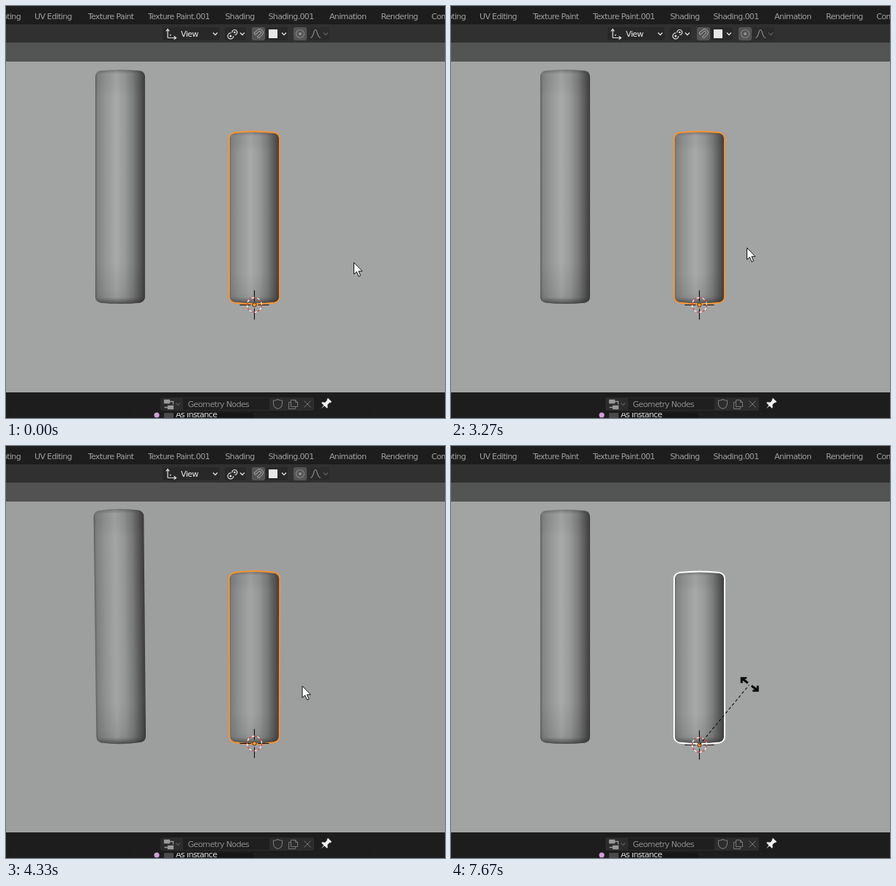
Animation of 600x563 px, one loop 8000 ms. Source, as an HTML page with a canvas:

```html
<!DOCTYPE html>
<html lang="en">
<head>
<meta charset="utf-8">
<title>Viewport orbit</title>
<style>
  html, body { margin: 0; height: 100%; overflow: hidden; background: #1d1d1d; }
  canvas { display: block; width: 100%; height: 100%; }
</style>
</head>
<body>
<canvas id="stage" width="600" height="563"></canvas>
<script>
const ctx = document.getElementById('stage').getContext('2d');
const LOOP = 8000, SCALE_START = 7470;

// Tubes: top x, y, bottom x, y, top and bottom half width, shoulder.
// Cross: x, y, angle, vertical squash. Light: backdrop grey, dimming of the tubes.
const FRONT = {
  left: [156, 87, 156, 407, 34, 34, 9],
  right: [339.5, 171.5, 339.5, 407, 34.5, 34.5, 9],
  cross: [339.5, 408.5, 0, 1],
  light: [162, 0]
};
const PITCHED = {
  left: [145.5, 82, 163, 408, 35.5, 33, 13],
  right: [339.5, 168.5, 339.5, 407.5, 35.5, 33, 14],
  cross: [339.5, 398.5, 0, .92],
  light: [139, .14]
};
const ROLLED = {
  left: [180, 59, 146, 385, 34, 33, 11],
  right: [355.5, 171, 325, 410, 34, 33.5, 12],
  cross: [323.5, 405.5, .125, .97],
  light: [151, .04]
};

const mix = (a, b, k) => a.map((v, i) => v + (b[i] - v) * k);
const mixView = (a, b, k) =>
  Object.fromEntries(Object.keys(a).map(key => [key, mix(a[key], b[key], k)]));
const ALMOST = mixView(FRONT, PITCHED, .15);

const VIEW_KEYS = [
  [0, FRONT], [3330, FRONT], [3670, PITCHED], [4070, ROLLED],
  [4330, mixView(FRONT, PITCHED, .2)], [4600, ALMOST], [5130, ALMOST], [5270, FRONT]
];
const POINTER_KEYS = [
  [0, [475.5, 350.5]], [340, [475.5, 350.5]], [1130, [359, 329]], [2130, [358.5, 329.5]],
  [2330, [358, 335]], [2600, [358, 335]], [3130, [404, 331]], [3270, [404.5, 330.5]],
  [3340, [404.5, 330.5]], [3670, [404.5, 378.5]], [4070, [384.5, 338.5]],
  [4330, [405, 328]], [4600, [407.5, 326.5]]
];

function sample(keys, time, blend) {
  const next = keys.findIndex(key => key[0] > time);
  if (next < 0) return keys[keys.length - 1][1];
  const [t0, a] = keys[next - 1], [t1, b] = keys[next];
  const k = (time - t0) / (t1 - t0);
  return blend(a, b, k * k * (3 - 2 * k));
}

function box(x, y, w, h, color, radius = 0) {
  ctx.fillStyle = color;
  ctx.beginPath();
  ctx.roundRect(x, y, w, h, radius);
  ctx.fill();
}

function line(path, color, width = 1.2) {
  ctx.strokeStyle = color;
  ctx.lineWidth = width;
  ctx.stroke(new Path2D(path));
}

function shape(path, color) {
  ctx.fillStyle = color;
  ctx.fill(new Path2D(path));
}

function disc(x, y, r, color) {
  ctx.fillStyle = color;
  ctx.beginPath();
  ctx.arc(x, y, r, 0, Math.PI * 2);
  ctx.fill();
}

function label(text, x, y, color, align = 'left') {
  ctx.font = '11px "DejaVu Sans", sans-serif';
  ctx.letterSpacing = '-0.65px';
  ctx.textAlign = align;
  ctx.fillStyle = color;
  ctx.fillText(text, x, y);
}

const chevron = (x, y, color) => line(`M${x - 3} ${y - 1.5}l3 3 3-3`, color, 1.3);

function gradient(x0, y0, x1, y1, stops) {
  const g = ctx.createLinearGradient(x0, y0, x1, y1);
  stops.forEach(([at, color]) => g.addColorStop(at, color));
  return g;
}

function drawTube([tx, ty, bx, by, wt, wb, s], dim, outline) {
  const length = Math.hypot(bx - tx, by - ty);
  const c = 1 + (s - 8) * .6;
  ctx.save();
  ctx.translate(tx, ty);
  ctx.rotate(Math.atan2(tx - bx, by - ty));

  const body = new Path2D();
  body.moveTo(-wt, s);
  body.quadraticCurveTo(-wt * .98, c + 1.5, -wt * .8, c);
  body.quadraticCurveTo(0, -c, wt * .8, c);
  body.quadraticCurveTo(wt * .98, c + 1.5, wt, s);
  body.lineTo(wb, length - s);
  body.quadraticCurveTo(wb * .98, length - c - 1.5, wb * .8, length - c);
  body.quadraticCurveTo(0, length + c, -wb * .8, length - c);
  body.quadraticCurveTo(-wb * .98, length - c - 1.5, -wb, length - s);
  body.closePath();

  const fills = [
    gradient(-wt, 0, wt, 0, [
      [0, '#626363'], [.05, '#828484'], [.2, '#949696'], [.42, '#a8aaa9'], [.6, '#989a99'],
      [.76, '#7c7d7d'], [.9, '#585858'], [1, '#3e3c3d']
    ]),
    gradient(0, 0, 0, length, [
      [0, 'rgba(40,40,40,.38)'], [6 / length, 'rgba(40,40,40,.06)'], [.06, 'rgba(40,40,40,.06)'],
      [.12, 'rgba(40,40,40,0)'], [.82, 'rgba(40,40,40,0)'], [.94, 'rgba(40,40,40,.09)'],
      [1 - 9 / length, 'rgba(40,40,40,.14)'], [1, 'rgba(30,30,30,.65)']
    ]),
    `rgba(0,0,0,${dim})`
  ];
  for (const fill of fills) {
    ctx.fillStyle = fill;
    ctx.fill(body);
  }

  const capAlpha = Math.max(0, (s - 11) / 3);
  if (capAlpha) {
    ctx.globalAlpha = capAlpha;
    ctx.fillStyle = gradient(0, 2, 0, s * 1.4, [[0, 'rgba(142,144,144,.6)'], [1, 'rgba(108,110,110,.6)']]);
    ctx.beginPath();
    ctx.ellipse(0, s * .75, wt * .9, s * .6, 0, 0, Math.PI * 2);
    ctx.fill();
    ctx.globalAlpha = 1;
  }
  if (outline) {
    ctx.strokeStyle = outline;
    ctx.lineWidth = 2;
    ctx.lineJoin = 'round';
    ctx.stroke(body);
  }
  ctx.restore();
}

function drawCross([x, y, angle, squash]) {
  ctx.save();
  ctx.translate(x, y);
  ctx.save();
  ctx.rotate(angle);
  ctx.scale(1, squash);
  line('M-20 0h15M5 0h15M0-20v15M0 5v15', '#0c0c0c', 1.1);
  ctx.restore();
  const step = Math.PI / 8;
  for (let i = 0; i < 16; i++) {
    ctx.strokeStyle = i % 2 ? '#f4f4f4' : '#e2403c';
    ctx.lineWidth = 1.3;
    ctx.beginPath();
    ctx.arc(0, 0, 10, i * step, (i + 1) * step);
    ctx.stroke();
  }
  disc(0, 0, 3, '#4a2a10');
  disc(0, 0, 2.2, '#f59a3a');
  ctx.restore();
}

function drawPointer([x, y]) {
  ctx.save();
  ctx.translate(x, y);
  const arrow = 'M0 0V16L3.8 12.6 6.5 19 9 17.9 6.4 11.8H11.4Z';
  shape(arrow, '#fff');
  line(arrow, '#111', 1);
  ctx.restore();
}

function drawScaleHandle([x, y], pivot) {
  ctx.setLineDash([4, 3]);
  line(`M${pivot[0]} ${pivot[1]}L${x} ${y}`, '#111', 1.1);
  ctx.setLineDash([]);
  ctx.save();
  ctx.translate(x + .7, y - .7);
  for (const turn of [0, Math.PI]) {
    ctx.save();
    ctx.rotate(turn);
    shape('M-12.5-10h8.5v2.5h-3l5.5 4.5-2 2.2-6-4.5v3.5h-3Z', '#0a0a0a');
    ctx.restore();
  }
  ctx.restore();
}

function drawTabs() {
  box(0, 0, 600, 25, '#1d1d1d');
  const grey = '#a0a0a0';
  label('Sculpting', 20, 18, grey, 'right');
  const tabs = [
    ['UV Editing', 39], ['Texture Paint', 112], ['Texture Paint.001', 194], ['Shading', 299.5],
    ['Shading.001', 358.5], ['Animation', 442], ['Rendering', 512.5], ['Compositing', 581.5]
  ];
  tabs.forEach(([text, x]) => label(text, x, 18, grey));
}

function drawTools() {
  const light = '#e0e0e0', dim = '#777';
  box(214, 29, 78, 18, '#282828', 3);
  line('M221 43.5V32M218.8 34.5l2.2-3 2.2 3M221 43.5h11M229.5 41.3l3 2.2-3 2.2M224 40.5l1.5-1.5', light);
  label('View', 239, 42, '#ececec');
  chevron(286, 38, light);

  box(299, 29, 29, 18, '#282828', 3);
  line('M311 41a4 4 0 1 1-3.5-4M309 36.5a3.5 3.5 0 1 1 3.5 3', light);
  disc(307, 41, 1.5, light);
  disc(312.5, 36, 1.3, light);
  chevron(323, 38, light);

  box(336, 29, 18, 18, '#545454', 3);
  line('M339 37l4.5-4a4.6 4.6 0 0 1 6.5 6.5l-4.5 4.5-2-2 4.5-4.5a1.8 1.8 0 0 0-2.6-2.6L341 39.5Z', '#b5b5b5', 1);
  box(355, 29, 30, 18, '#282828', 3);
  box(359, 32, 12, 12, '#e6e6e6');
  chevron(380, 38, light);

  box(393, 29, 18, 18, '#545454', 3);
  line('M407.5 38a5.5 5.5 0 1 1-11 0a5.5 5.5 0 1 1 11 0', '#858585');
  disc(402, 38, 2, '#929292');
  box(412, 29, 30, 18, '#2b2b2b', 3);
  line('M416 43.5c5 0 4-11 7-11s2 11 7 11', '#8a8a8a');
  chevron(437, 38, '#5a5a5a');
}

function drawNodeEditor() {
  box(0, 528, 600, 35, '#1d1d1d');
  for (let x = 12; x < 600; x += 20.5) box(x, 557, 1, 1, '#303030');

  box(216, 556, 122, 7, '#161616');
  box(216, 556, 13, 7, '#4a4a4a');
  disc(206, 559, 3.6, '#cfa0dc');
  ctx.save();
  ctx.beginPath();
  ctx.rect(200, 556, 200, 7);
  ctx.clip();
  label('As Instance', 232, 562, '#e0e0e0');
  line('M512 554L527 564.5', '#00cfa0', 2);
  ctx.restore();

  const grey = '#777';
  box(211, 535, 210, 18, '#2c2c2c', 3);
  box(242, 536, 118, 16, '#1f1f1f');
  line('M216.5 538.5h7v4h-7zM221.5 546.5h7v4h-7zM223.5 540.5h5v4M216.5 548.5h5', '#999', 1.3);
  box(217, 539, 6, 3, '#999');
  box(222, 547, 6, 3, '#999');
  chevron(235, 544, '#555');
  label('Geometry Nodes', 248.5, 548, '#8c8c8c');
  line('M371.5 537.5c-2 1.5-4 1.7-6 1.7v4c0 4 3 6.3 6 7.3 3-1 6-3.3 6-7.3v-4c-2 0-4-.2-6-1.7Z', grey, 1.1);
  line('M389.5 538.5h6l3 3v6h-9zM389.5 541.5h-3v9h9v-3M395.5 538.5v3h3', grey, 1);
  line('M407.5 539.5l9 9M416.5 539.5l-9 9', grey, 1);
  shape('M438.5 537l5.5 6 0 0-2 0.5-2.5 3 .5 2.5-2 0-3-3-4 4.5-1 0 0-1 4.5-4-3-3 0-2 2.5.5 3-2.5.5-2Z', 'transparent');
  ctx.save();
  ctx.translate(437, 544);
  ctx.rotate(Math.PI / 4);
  shape('M-3.5-8h7v2.2l-1.2.8v4l3 2.5v1.5h-4.6l-.7 6-.7-6h-4.6v-1.5l3-2.5v-4l-1.2-.8Z', '#f2f2f2');
  ctx.restore();
}

function draw(time) {
  const view = sample(VIEW_KEYS, time, mixView);
  const pointer = sample(POINTER_KEYS, time, mix);
  const scaling = time >= SCALE_START;
  const [grey, dim] = view.light;

  box(0, 50, 600, 480, `rgb(${grey},${grey + .6},${grey + 1})`);
  drawTube(view.left, dim);
  drawTube(view.right, dim, scaling ? '#fff' : '#f7942f');
  drawCross(view.cross);
  box(0, 50, 600, 26, 'rgba(48,48,48,.684)');

  box(0, 24, 600, 26, '#303030');
  drawTabs();
  if (!scaling) drawTools();
  drawNodeEditor();

  if (scaling) drawScaleHandle(pointer, view.cross);
  else drawPointer(pointer);
}

const start = performance.now();
function tick() {
  draw((performance.now() - start) % LOOP);
  requestAnimationFrame(tick);
}
tick();
</script>
</body>
</html>
```
